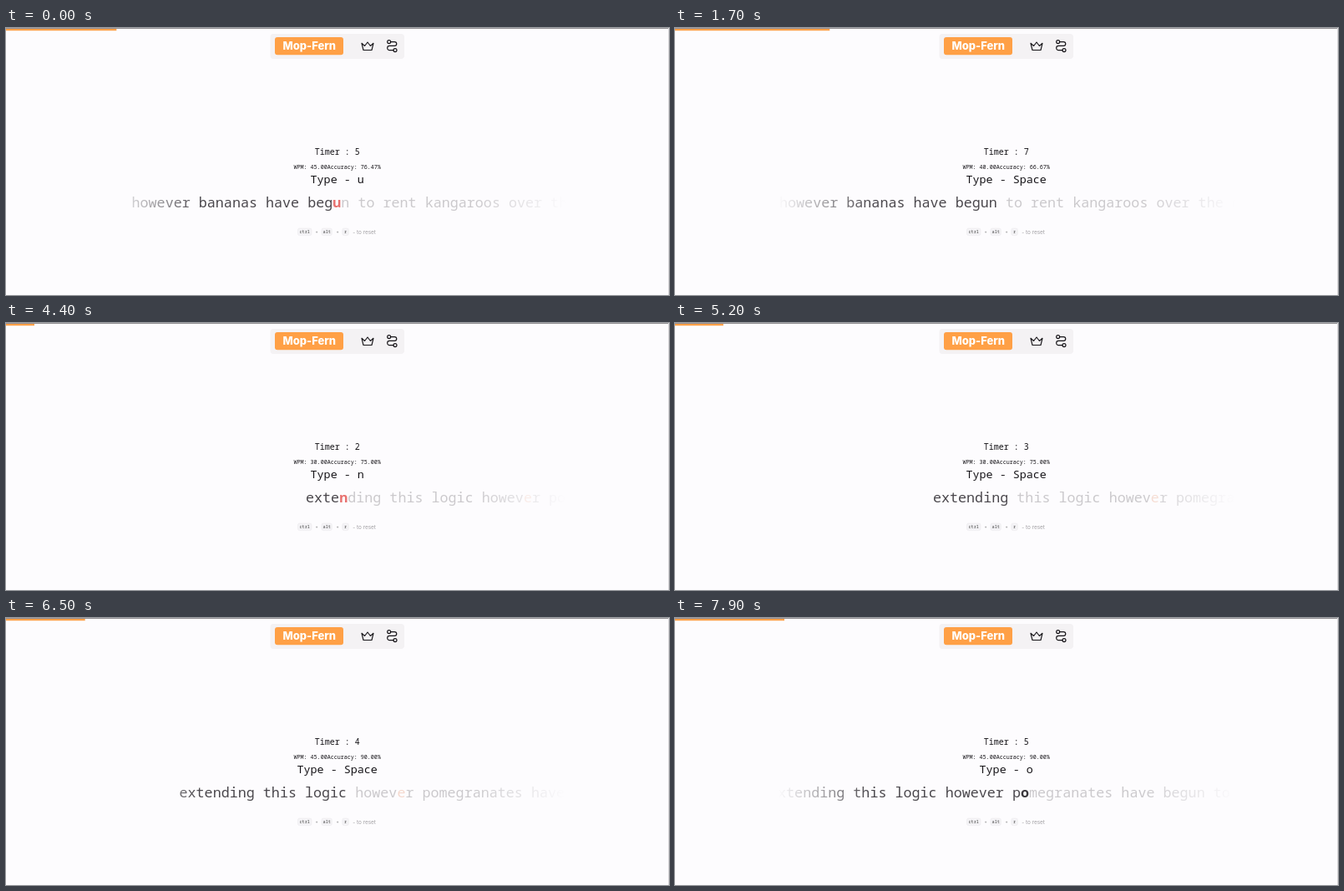
Recreate the animation shown at these times as an HTML page. Size 794 by 320 pixels, loop 8000 ms.

```html
<!DOCTYPE html>
<html lang="en">
<head>
<meta charset="utf-8">
<title>Typing practice</title>
<style>
  html, body { margin: 0; width: 100%; height: 100%; overflow: hidden; background: #fdfcfe; }
  svg { display: block; }
  text { font-family: "Noto Sans Mono", "DejaVu Sans Mono", monospace; white-space: pre; }
  .mid { text-anchor: middle; fill: #161418; }
  .icon { fill: none; stroke: #161418; stroke-width: 1.15; stroke-linejoin: round; stroke-linecap: round; }
  .key { fill: #f4f3f6; stroke: #e9e7eb; stroke-width: .5; }
  #hint text { font-size: 5.2px; text-anchor: middle; fill: #444; }
  #hint .soft { fill: #777; }
  #hint .reset { font: 6.4px Inter, sans-serif; text-anchor: start; fill: #a3a1a5; }
  #line { font-size: 16.73px; fill: #4a474c; }
  .just { font-weight: 500; }
  .now { font-weight: 700; fill: #3b383d; }
  .wrong { font-weight: 700; fill: #e8716f; }
  .todo { fill: #cbc9cc; }
  .missed { fill: #f5d9ce; }
</style>
</head>
<body>
<svg width="794" height="320">
  <defs>
    <linearGradient id="fade">
      <stop offset="0" stop-color="#fff" stop-opacity="0"/>
      <stop offset=".2" stop-color="#fff"/>
      <stop offset=".8" stop-color="#fff"/>
      <stop offset="1" stop-color="#fff" stop-opacity="0"/>
    </linearGradient>
    <mask id="window" maskUnits="userSpaceOnUse" x="124" y="190" width="546" height="40">
      <rect x="124" y="190" width="546" height="40" fill="url(#fade)"/>
    </mask>
  </defs>

  <rect width="794" height="1" fill="#929094"/>
  <rect x="793" width="1" height="320" fill="#dcdadd"/>
  <rect id="bar" y="1" height="2.2" fill="#ffa046"/>

  <rect x="316.5" y="7" width="160.5" height="30" rx="4" fill="#f4f2f4"/>
  <rect x="322" y="11" width="82" height="21.3" rx="3" fill="#ffa046"/>
  <text x="363.3" y="25.6" text-anchor="middle" fill="#fff" style="font:800 13px Inter,sans-serif">Mop-Fern</text>
  <path class="icon" d="M426 18.3l3.6 3.2 3.4-4.5 3.4 4.5 3.6-3.2-2 8.2h-10z"/>
  <g class="icon">
    <circle cx="458.7" cy="16.6" r="2"/>
    <circle cx="466" cy="26.6" r="2"/>
    <path d="M460.8 16.6h4.6a2.4 2.4 0 0 1 0 4.8h-6.1a2.6 2.6 0 0 0 0 5.2h4.6"/>
  </g>

  <g id="stats">
    <text id="timer" class="mid" x="396.7" y="151.8" font-size="10"/>
    <text id="score" class="mid" x="396.7" y="168.7" font-size="6.7"/>
    <text id="prompt" class="mid" x="396.7" y="186.3" font-size="13.4"/>
  </g>
  <g mask="url(#window)"><text id="line" y="215"/></g>

  <g id="hint">
    <rect class="key" x="349.5" y="240" width="16.5" height="8.6" rx="2"/>
    <rect class="key" x="378" y="240" width="12.3" height="8.6" rx="2"/>
    <rect class="key" x="402.8" y="240" width="7.5" height="8.6" rx="2"/>
    <text x="357.7" y="246">ctrl</text>
    <text class="soft" x="372" y="246.6">+</text>
    <text x="384.2" y="246">alt</text>
    <text class="soft" x="397" y="246.6">+</text>
    <text x="406.5" y="246">r</text>
    <text class="reset" x="415.3" y="246.6">- to reset</text>
  </g>
</svg>
<script>
const $ = id => document.getElementById(id);
const FIRST = "however bananas have begun to rent kangaroos over the moon";
const SECOND = "extending this logic however pomegranates have begun to rent kangaroos";
const MISSED = 26, STEP = 794 / 30;

// Tracks of [seconds, value], joined by straight lines
const seconds = [[0, 5], [.9, 5.98], [1.7, 7], [2.1, 7], [2.8, 0], [3.2, 0], [4.1, .98], [4.4, 1.284],
  [5, 1.97], [5.9, 2.95], [6, 2.99], [6.8, 3.93], [7, 4], [7.9, 4.95]];
const scroll = [[0, 150.5], [1.7, 125], [2.1, 125], [2.8, 394], [3.2, 394], [4.4, 359], [4.7, 353],
  [6, 238.5], [7, 176.5], [7.9, 113]];
const typed = [[0, 24], [.5, 24], [1.5, 26], [2.1, 26], [2.2, 0], [3.2, 0], [4.2, 4], [4.7, 4],
  [6, 17], [7, 24], [7.9, 30]];

function at(track, t) {
  const i = track.findIndex(p => p[0] >= t);
  if (i < 1) return track[i ? track.length - 1 : 0][1];
  const [[t0, a], [t1, b]] = [track[i - 1], track[i]];
  return a + (b - a) * (t - t0) / (t1 - t0);
}

function score(t, timer) {
  const [wpm, accuracy] = t < 2.2
    ? (timer < 6 ? ["45.00", "76.47"] : ["40.00", "66.67"])
    : timer < 2 ? ["Infinity", "NaN"]
    : timer < 4 ? ["30.00", "75.00"] : ["45.00", "90.00"];
  return `WPM: ${wpm}Accuracy: ${accuracy}%`;
}

const span = (cls, s) => `<tspan class="${cls}">${s}</tspan>`;

function draw(t) {
  const reset = t >= 2.2, idle = reset && t < 3.3;
  const text = reset ? SECOND : FIRST;
  const n = Math.floor(at(typed, t) + 1e-6);
  const elapsed = at(seconds, t);
  const timer = idle ? 0 : Math.ceil(elapsed - 1e-6);
  const wrong = t < 1 && n === 24 || t >= 4.2 && t < 4.8 && n === 4;

  $("bar").setAttribute("width", elapsed * STEP);
  $("timer").textContent = "Timer : " + timer;
  $("score").textContent = score(t, timer);
  $("prompt").textContent = "Type - " + (text[n] === " " ? "Space" : text[n]);
  $("stats").setAttribute("transform", `translate(0 ${idle ? .8 : 0})`);
  $("hint").setAttribute("transform", `translate(0 ${idle ? -.5 : 0})`);

  let rest = span("todo", text.slice(n + 1));
  if (reset && n < MISSED) {
    rest = span("todo", text.slice(n + 1, MISSED)) + span("missed", text[MISSED]) +
      span("todo", text.slice(MISSED + 1));
  }
  const last = Math.max(0, n - 1);
  $("line").setAttribute("x", at(scroll, t));
  $("line").innerHTML = text.slice(0, last) + span("just", text.slice(last, n)) +
    span(wrong ? "wrong" : "now", text[n]) + rest;
}

const start = performance.now();
function tick() {
  const ms = Math.max(0, performance.now() - start) % 8000;
  draw(Math.floor(ms / 100) / 10); // ten steps a second
  requestAnimationFrame(tick);
}
tick();
</script>
</body>
</html>
```
